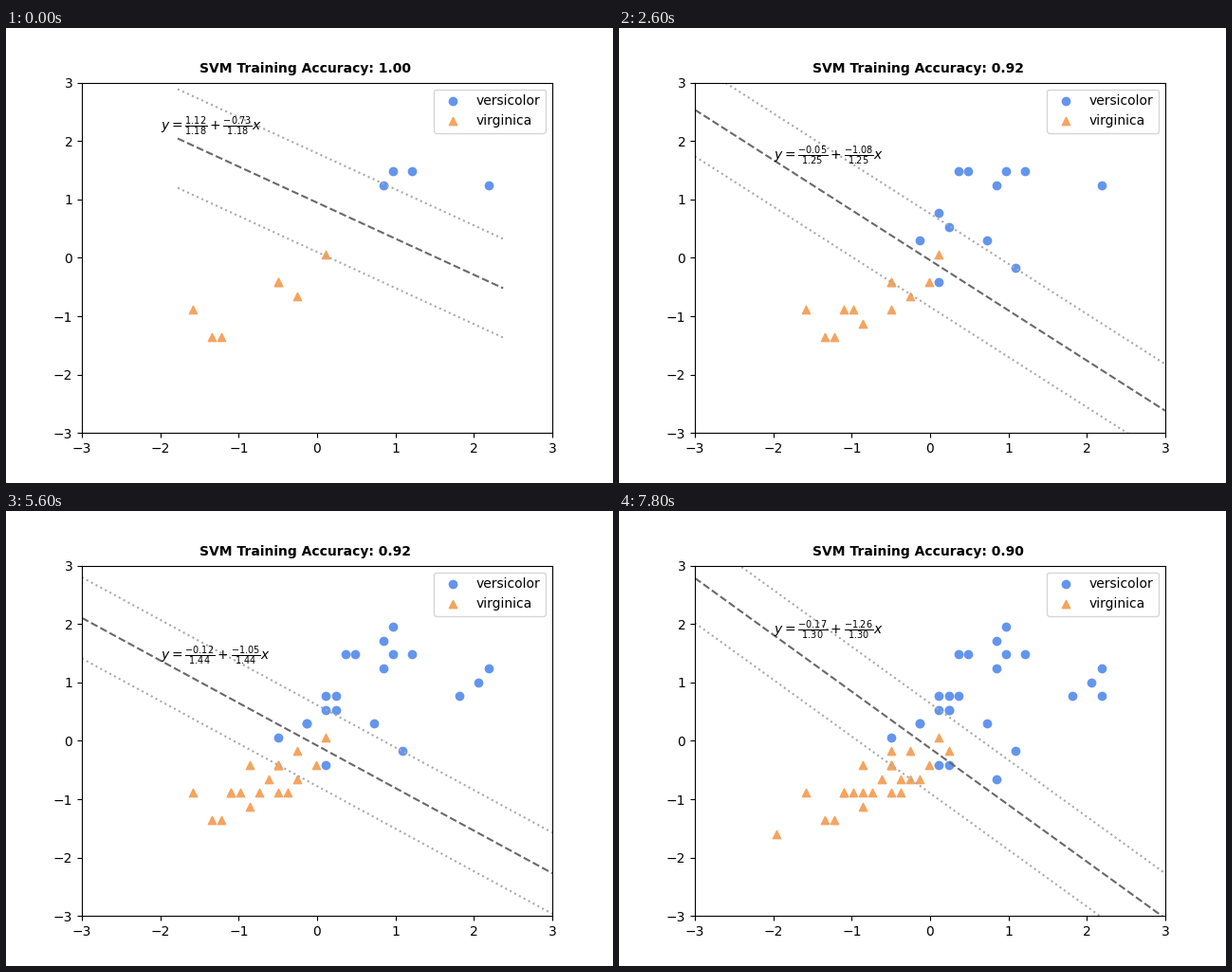
Recreate the animation shown at these times as a matplotlib script. Size 640 px wide and 480 px high, loop 8 s.

```python
import matplotlib.pyplot as plt
import numpy as np
from matplotlib.animation import FuncAnimation

FRAMES, STEP_MS, START = 40, 200, 11
A, B = 1, -1  # class signs: circles, triangles

# petal length, petal width, class, in order of arrival
SAMPLES = [
    (5.6, 2.2, A), (3.6, 1.3, B), (5.7, 2.3, A), (3.8, 1.1, B), (3.9, 1.1, B),
    (4.5, 1.5, B), (5.9, 2.3, A), (4.7, 1.4, B), (6.7, 2.2, A), (5.0, 1.7, B),
    (4.5, 1.5, B),
    (5.1, 1.9, A), (4.5, 1.3, B), (5.5, 1.8, A), (4.2, 1.2, B), (5.0, 1.5, A),
    (5.2, 2.3, A), (4.0, 1.3, B), (4.8, 1.8, A), (5.0, 2.0, A), (4.9, 1.5, B),
    (5.3, 2.3, A), (4.1, 1.3, B), (5.8, 1.6, A),
    (4.2, 1.5, B), (5.6, 2.4, A), (5.1, 2.0, A), (4.4, 1.4, B), (6.4, 2.0, A),
    (4.3, 1.3, B), (5.0, 1.9, A), (4.6, 1.3, B),
    (5.7, 2.5, A), (4.0, 1.3, B), (4.5, 1.7, A), (4.7, 1.6, B), (6.6, 2.1, A),
    (4.5, 1.5, B), (4.8, 1.8, A),
    (5.2, 2.0, A), (5.1, 1.5, A), (4.8, 1.4, B), (5.6, 1.4, A), (5.1, 1.9, A),
    (4.5, 1.6, B), (6.7, 2.0, A), (5.1, 1.6, B), (4.6, 1.4, B), (3.3, 1.0, B),
    (4.2, 1.3, B),
]
data = np.array(SAMPLES)
points = (data[:, :2] - [4.906, 1.676]) / [0.8214, 0.4227]
signs = data[:, 2]


def fit_svm(x, s, tol=1e-4):
    """Soft-margin linear SVM with C = 1, solved pair by pair."""
    hi, lo = np.maximum(s, 0), np.minimum(s, 0)
    beta = np.zeros(len(s))
    v = s.copy()
    gram = x @ x.T
    for _ in range(20000):
        i = np.argmax(np.where(beta < hi - 1e-9, v, -np.inf))
        j = np.argmin(np.where(beta > lo + 1e-9, v, np.inf))
        gap = v[i] - v[j]
        if gap < tol:
            break
        curve = max(gram[i, i] + gram[j, j] - 2 * gram[i, j], 1e-12)
        t = min(gap / curve, hi[i] - beta[i], beta[j] - lo[j])
        beta[i] += t
        beta[j] -= t
        v -= t * (gram[:, i] - gram[:, j])
    free = (beta < hi - 1e-9) & (beta > lo + 1e-9)
    bias = v[free].mean() if free.any() else (v[i] + v[j]) / 2
    return beta @ x, bias


def solve(frame):
    n = START + frame
    x, s = points[:n], signs[:n]
    w, bias = fit_svm(x, s)
    accuracy = np.mean(np.sign(x @ w + bias) == s)
    return x, s, w, bias, accuracy


steps = [solve(k) for k in range(FRAMES)]

fig, ax = plt.subplots(figsize=(6.4, 4.8), dpi=100)
ax.set(xlim=(-3, 3), ylim=(-3, 3))
circles = ax.scatter([], [], c="cornflowerblue", marker="o", label="versicolor")
triangles = ax.scatter([], [], c="sandybrown", marker="^", label="virginica")
ax.legend(loc="upper right")
boundary, = ax.plot([], [], "--", color="dimgray")
margins = [ax.plot([], [], ":", color="darkgray")[0] for _ in range(2)]
formula = ax.text(-2, 0, "", fontsize=10)
title = ax.text(0.25, 1.03, "", transform=ax.transAxes, fontsize=10,
                fontweight="bold")


def update(frame):
    x, s, w, bias, accuracy = steps[frame]
    circles.set_offsets(x[s == A])
    triangles.set_offsets(x[s == B])

    # the first line only spans the padded range of the data
    if frame == 0:
        pad = 0.05 * np.ptp(x[:, 0])
        ends = np.array([x[:, 0].min() - pad, x[:, 0].max() + pad])
    else:
        ends = np.array([-3.0, 3.0])

    def line(px, level=0):
        return (level - bias - w[0] * px) / w[1]

    boundary.set_data(ends, line(ends))
    for artist, level in zip(margins, (1, -1)):
        artist.set_data(ends, line(ends, level))

    formula.set_y(line(-2))
    formula.set_text(rf"$y = \frac{{{-bias:.2f}}}{{{w[1]:.2f}}}"
                     rf" + \frac{{{-w[0]:.2f}}}{{{w[1]:.2f}}}x$")
    title.set_text(f"SVM Training Accuracy: {accuracy:.2f}")
    return circles, triangles, boundary, *margins, formula, title


anim = FuncAnimation(fig, update, frames=FRAMES, interval=STEP_MS,
                     repeat=True, repeat_delay=0)
plt.show()
```
